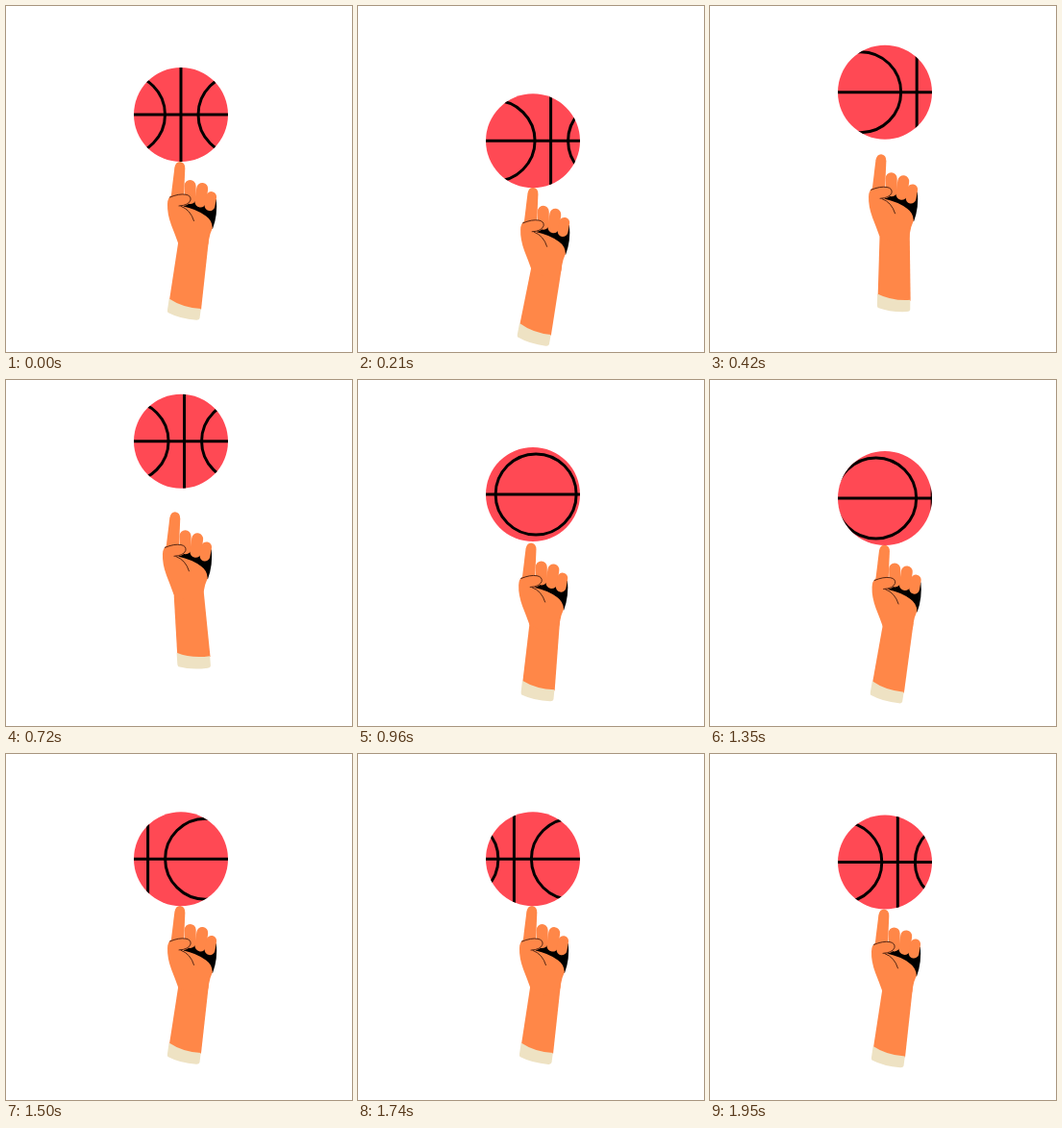
Write an HTML page that moves like this. It is 360 px wide and 360 px high and loops after 1980 ms.

```html
<!DOCTYPE html>
<html lang="en">
<head>
<meta charset="utf-8">
<title>Spinning ball</title>
<style>
  html, body { margin: 0; width: 100%; height: 100%; overflow: hidden; background: #fff; }
  svg { display: block; width: 100%; height: 100%; }
  .skin { fill: #ff8748; }
  .finger { fill: none; stroke: #ff8748; stroke-linecap: round; stroke-width: 12; }
  .crease { fill: none; stroke: #2a0f08; stroke-width: .8; stroke-linecap: round; }
  .seam { fill: none; stroke: #000; stroke-width: 3; }
</style>
</head>
<body>
<svg viewBox="0 0 360 360">
  <defs>
    <clipPath id="round"><circle r="49"/></clipPath>
  </defs>

  <g id="hand">
    <g id="forearm">
      <circle class="skin" cx="195" cy="244" r="15.8"/>
      <path class="skin" d="M179.2 246 L170 306 Q184 316 203 316 L211 243 Z"/>
      <path fill="#eee2c3" d="M169.700 304.500 Q184 314 202.800 315 L201.500 325 Q201 327 198 326.800 Q181 325.500 168.500 319 Q167.700 318 168 316 Z"/>
    </g>
    <path d="M183 207 L193 201 L208 207 L218.800 201 Q220.500 217 215 232 L198 222 Z"/>
    <path class="skin" d="M175.400 168 Q176.500 162 181 162 Q186.300 162.500 186.300 169 L185 200 L171.500 200 Z"/>
    <path class="finger" d="M191.600 187 L191.800 200"/>
    <path class="finger" d="M204.200 190 L202.400 203.500"/>
    <path class="finger" style="stroke-width:10.800" d="M213.700 198.500 L212 207.800"/>
    <path class="skin" d="M173 196.500 Q168 199 168 206 Q167.600 216 172 228 Q176 238 179.200 247 L195 256 L210.900 244 Q212 237 214.800 231 Q214.500 223 208 218.500 Q199 211.500 184 208.200 Q191 207 192 202.500 Q192.500 197 186 196 Z"/>
    <path class="crease" d="M170.500 199 Q180 195 187 196.200 Q192.800 197.300 192 202 Q190 207.500 180 208"/>
    <path class="crease" d="M182 208.300 Q192 212 195.500 223.500"/>
  </g>

  <g id="ball">
    <circle r="49" fill="#ff4954"/>
    <g clip-path="url(#round)">
      <path class="seam" d="M-60 0 H60"/>
      <g id="seams"></g>
    </g>
  </g>
</svg>
<script>
  const LOOP = 1980, STEP = 30;
  const PERIOD = 118.5;   // distance between two straight seams

  // Key poses: time, ball height, hand height, forearm angle
  const poses = [
    [0, 0, 0, 0],             // rest
    [180, 29, 28, 3],         // wind up
    [420, -23.3, -7.7, -7],   // throw
    [620, -51, -23.5, -11.5], // top
    [720, -49.3, -24.7, -12],
    [960, 6, 7.5, -2],        // catch
    [1190, 21.4, 20.7, 2.5],  // sink
    [1540, -4.8, -5, 0],      // lift
    [LOOP, 0, 0, 0]
  ];
  // Turns of the ball: quickest around the catch
  const spin = [[0, 0], [420, 1.72], [720, 2.97], [960, 4.48], [1200, 5.8], [1500, 7.29], [LOOP, 9]];

  // Smooth looping curve through one column of keys, without overshoot.
  function curve(keys, t, col = 1) {
    const n = keys.length - 1;
    const slope = i => {
      const k = (i + n) % n, a = keys[k], b = keys[k + 1];
      return (b[col] - a[col]) / (b[0] - a[0]);
    };
    const tangent = i => {
      const a = slope(i - 1), b = slope(i);
      return a * b > 0 ? 2 * a * b / (a + b) : 0;
    };
    let i = 0;
    while (t >= keys[i + 1][0]) i++;
    const a = keys[i], b = keys[i + 1];
    const h = b[0] - a[0], u = (t - a[0]) / h, w = 1 - u;
    return a[col] * w * w * (1 + 2 * u) + b[col] * u * u * (3 - 2 * u)
      + h * u * w * (tangent(i) * w - tangent(i + 1) * u);
  }

  const el = id => document.getElementById(id);
  const place = (id, value) => el(id).setAttribute("transform", value);

  let seams = "";
  for (let x = -PERIOD; x <= PERIOD; x += PERIOD) {
    seams += `<path class="seam" d="M${x} -55 V55"/><circle class="seam" cx="${x + 60}" r="42"/>`;
  }
  el("seams").innerHTML = seams;

  function draw(t) {
    const turns = curve(spin, t), angle = curve(poses, t, 3);
    place("ball", `translate(182 ${113 + curve(poses, t, 1)})`);
    place("seams", `translate(${(Math.round(turns) - turns) * PERIOD})`);
    place("hand", `translate(${angle * .42} ${curve(poses, t, 2)})`);
    place("forearm", `rotate(${angle} 195 245)`);
  }

  const start = performance.now();
  function tick() {
    const t = (performance.now() - start) % LOOP;
    draw(Math.floor(t / STEP) * STEP);
    requestAnimationFrame(tick);
  }
  tick();
</script>
</body>
</html>
```
